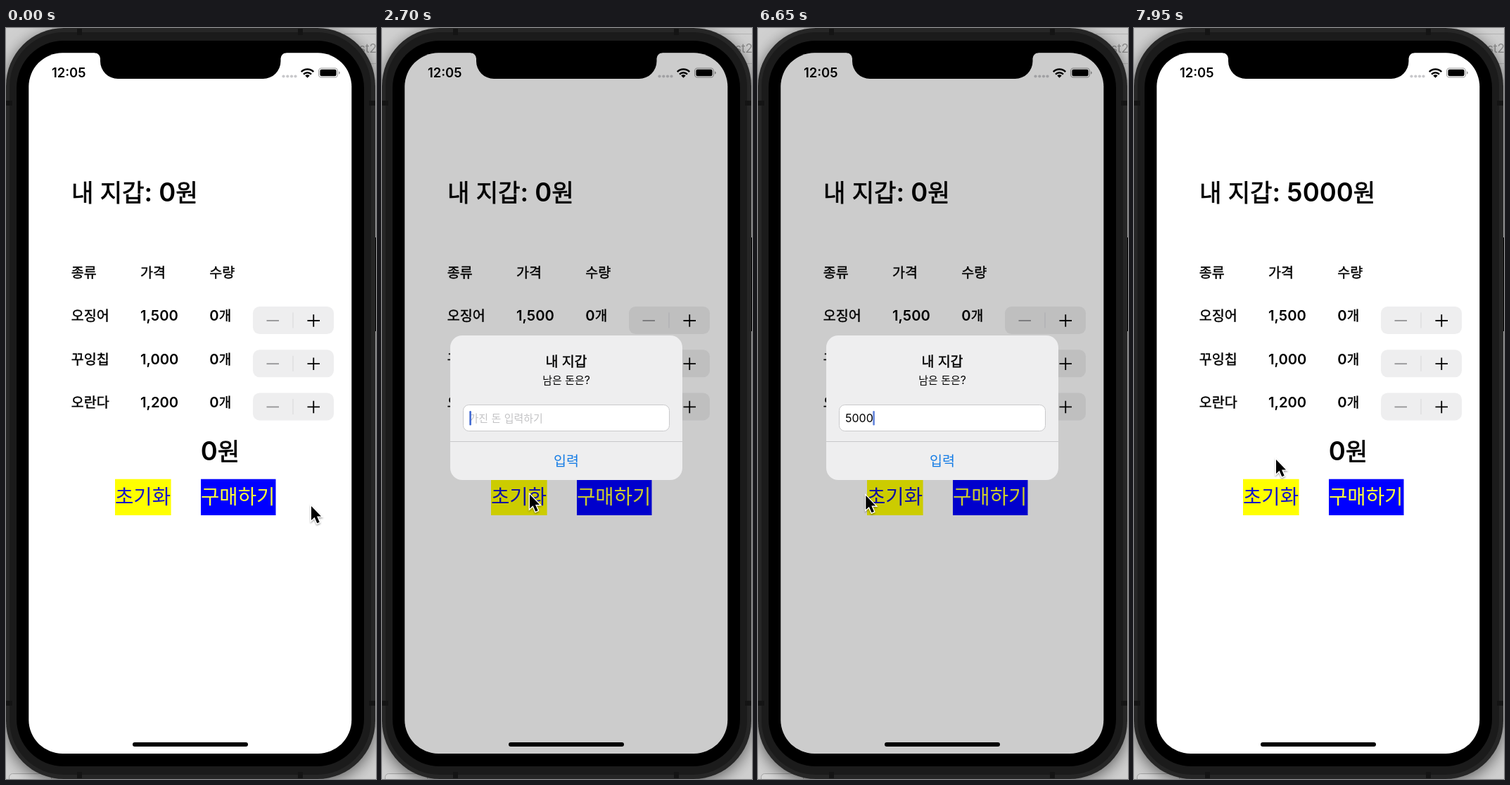
An HTML page that plays this animation: 526x1065 px, repeating every 8 s.

```html
<!DOCTYPE html>
<html lang="ko">
<head>
<meta charset="utf-8">
<title>내 지갑</title>
<style>
  html, body { margin: 0; width: 100%; height: 100%; overflow: hidden; background: #d0d0d0; }
  svg { display: block; width: 526px; height: 1065px; }
  text { font-family: Inter, "Noto Sans CJK KR", sans-serif; white-space: pre; }
  .ko { font-family: "Noto Sans CJK KR", "Noto Sans CJK", sans-serif; font-weight: 400; }
</style>
</head>
<body>
<svg id="stage" viewBox="0 0 526 1065" xmlns="http://www.w3.org/2000/svg"></svg>
<script>
const LOOP = 8000;
const stage = document.getElementById('stage');

// Hangul runs are set slightly smaller than Latin ones; bold adds a thin outline.
const runs = (str, size, bold) => str.replace(/[가-힣]+/g, run =>
  `<tspan class="ko" font-size="${size * 0.94}"` +
  (bold ? ` stroke="currentColor" stroke-width="${size * 0.02}"` : '') + `>${run}</tspan>`);

const label = (str, x, y, size, { bold = true, color = '#000', anchor = 'start', id = '' } = {}) =>
  `<text id="${id}" x="${x}" y="${y}" font-size="${size}" font-weight="${bold ? 600 : 400}"
    fill="${color}" color="${color}" text-anchor="${anchor}">${runs(str, size, bold)}</text>`;

const rect = (x, y, w, h, r, fill, extra = '') =>
  `<rect x="${x}" y="${y}" width="${w}" height="${h}" rx="${r}" fill="${fill}" ${extra}/>`;

const line = (d, color, width, extra = '') =>
  `<path d="${d}" fill="none" stroke="${color}" stroke-width="${width}" ${extra}/>`;

const stepper = y => rect(351, y, 115, 39, 9.5, '#eeeeef') +
  line(`M408 ${y + 8.5}v22`, '#dadadc', 1.2) +
  line(`M370.5 ${y + 20}h17.5`, '#949496', 1.8) +
  line(`M428.5 ${y + 20}h17.5m-8.75 -8.75v17.5`, '#000', 1.8);

const row = ([name, price], i) => {
  const y = 415.3 + i * 61.2;
  return label(name, 92.7, y, 20.8) + label(price, 191, y, 20.2) +
    label('0개', 289.3, y, 20.2) + stepper(395 + i * 61.2);
};

const device = `
  <defs>
    <filter id="soft" x="-50%" y="-50%" width="200%" height="200%">
      <feDropShadow dx="0" dy="1.5" stdDeviation="1.3" flood-opacity=".4"/>
    </filter>
    <filter id="shade" x="-10%" y="-10%" width="120%" height="120%">
      <feDropShadow dx="0" dy="5" stdDeviation="11" flood-opacity=".55"/>
    </filter>
  </defs>
  ${rect(0, 0, 526, 1065, 0, '#d0d0d0')}
  ${line('M480 8.5h46M480 50.5h46', '#b4b4b4', 1)}
  ${label('st2', 502, 35, 17, { bold: false, color: '#8b8b8b' })}
  ${rect(4.5, 1057.5, 60, 20, 5, '#d8d8d8', 'stroke="#a4a4a4"')}
  ${rect(522, 297, 6, 133, 1, '#000')}
  ${rect(0, 0, 525, 1065, 82, '#282828', 'filter="url(#shade)"')}
  ${rect(5, 6, 514, 1053, 77, '#1b1b1b')}
  ${line('M104.5 1v9M418.5 1v9M104.5 1055v9M418.5 1055v9M0 106.5h9M516 106.5h9M0 957.5h9M516 957.5h9', '#141414', 7)}
  ${rect(15, 18, 494, 1029, 67, '#000')}`;

const app = `
  ${rect(32.3, 35.3, 459, 993.7, 48, '#fff')}
  <g fill="#c8c8cb">${[394.5, 400.3, 406, 411.5].map(x => `<circle cx="${x}" cy="68.5" r="2.1"/>`).join('')}</g>
  ${label('12:05', 65, 69.8, 18.4)}
  ${line('M419.8 62.2a12.3 12.3 0 0 1 17.4 0M423 65.6a7.8 7.8 0 0 1 11 0', '#000', 2.5)}
  <path d="M425.3 67.6a4.6 4.6 0 0 1 6.4 0l-3.2 3.2z"/>
  ${rect(444.6, 57, 26.8, 13, 3.8, 'none', 'stroke="#9d9d9d" stroke-width="1.1"')}
  ${rect(446.4, 58.8, 23.2, 9.4, 2.2, '#000')}
  <path d="M473 61.3q1.8 .7 1.8 2.2t-1.8 2.2z" fill="#9d9d9d"/>
  <g id="wallet"></g>
  ${label('종류', 92.7, 353.5, 20.8)}${label('가격', 191, 353.5, 20.8)}${label('수량', 289.3, 353.5, 20.8)}
  ${[['오징어', '1,500'], ['꾸잉칩', '1,000'], ['오란다', '1,200']].map(row).join('')}
  ${label('0원', 276.7, 613.3, 36.4)}
  ${rect(155, 639.7, 79.6, 51.3, 0, '#ff0')}${rect(277, 639.7, 106.5, 51.3, 0, '#00f')}
  ${label('초기화', 155, 675.4, 30.5, { bold: false, color: '#1414cc', id: 'reset' })}
  ${label('구매하기', 277, 675.4, 30.5, { bold: false, color: '#ffff38' })}
  ${rect(32.3, 35.3, 459, 993.7, 48, '#000', 'id="dim"')}
  <path d="M126 34v1.3a8 8 0 0 1 8 8V47a25 25 0 0 0 25 25H365.5a25 25 0 0 0 25 -25V43.3a8 8 0 0 1 8 -8V34z"/>
  ${rect(180, 1013, 164, 6, 3, '#000')}`;

const alertBox = `<g id="alert">
  ${rect(97, 436, 330, 205, 17, '#eeeeef')}
  ${label('내 지갑', 262, 480.3, 20.8, { anchor: 'middle' })}
  ${label('남은 돈은?', 262, 504.8, 15.9, { bold: false, anchor: 'middle' })}
  ${rect(115.5, 534.5, 293, 37, 8, '#fff', 'stroke="#c9c9cb" id="field"')}
  ${label('가진 돈 입력하기', 123.5, 559.3, 15.9, { bold: false, color: '#c3c3c5', id: 'hint' })}
  ${label('', 124, 559.3, 16, { bold: false, id: 'value' })}
  ${rect(124.3, 543, 2.6, 20.5, 1.2, '#4169d2', 'id="caret"')}
  ${line('M97 586.5h330', '#c8c8ca', 1)}
  ${label('입력', 262, 621.3, 20.8, { bold: false, color: '#147ce5', anchor: 'middle' })}
</g>`;

const pointer = `<g id="pointer" filter="url(#soft)">
  <path d="M0 0V20L4.6 15.8 8.3 24.2 11.7 22.7 8 14.5H14z" stroke="#fff" stroke-width="2.6" paint-order="stroke"/>
</g>`;

stage.innerHTML = device + app + alertBox + pointer;
const $ = id => document.getElementById(id);

const clamp = v => Math.min(1, Math.max(0, v));
const ramp = (t, from, to) => clamp((t - from) / (to - from));
const ease = u => u * u * (3 - 2 * u);

// Critically damped spring, time in ms.
const spring = t => t <= 0 ? 0 : 1 - (1 + t * 0.023) * Math.exp(-t * 0.023);

const pointerPath = [
  [0, 434, 678], [700, 210, 661.5], [5300, 210, 661.5], [5500, 150.5, 665],
  [6400, 150.5, 665], [6450, 151.5, 665], [6600, 151.5, 665], [7050, 202, 612]
];
function pointerAt(t) {
  const i = pointerPath.findIndex(key => key[0] > t);
  if (i < 0) return pointerPath.at(-1).slice(1);
  const [t0, x0, y0] = pointerPath[i - 1], [t1, x1, y1] = pointerPath[i];
  const u = ease(ramp(t, t0, t1));
  return [x0 + (x1 - x0) * u, y0 + (y1 - y0) * u];
}

const edits = [[3850, '5'], [4100, '50'], [4250, '500'], [4450, '5000'], [4850, '50000'], [6150, '5000']];

// Solid for half a second after each edit, then a one-second blink.
function caretAt(t, since) {
  if (t >= 6800) return 0;
  const phase = (t - since) % 1000;
  return 1 - ramp(phase, 470, 650) + ramp(phase, 850, 1000);
}

let walletText = '';
function draw(t) {
  const shown = spring(t - 1575), closed = spring(t - 7164);
  const opacity = shown * (1 - closed);
  const scale = 1.2 - 0.2 * shown;

  const wallet = t < 7500 ? '내 지갑: 0원' : '내 지갑: 5000원';
  if (wallet !== walletText) {
    $('wallet').innerHTML = label(wallet, 93, 246, 36.4);
    walletText = wallet;
  }

  const pressed = ramp(t, 700, 800) - ramp(t, 900, 1100);
  $('reset').setAttribute('opacity', 1 - 0.7 * pressed);
  $('dim').setAttribute('opacity', 0.2 * opacity);
  $('alert').setAttribute('opacity', opacity);
  $('alert').setAttribute('transform', `translate(262 538.5) scale(${scale}) translate(-262 -538.5)`);

  // The field only turns fully white once the alert is opaque.
  const white = 255 - 80 * (1 - opacity);
  $('field').setAttribute('fill', `rgb(${white},${white},${white})`);

  const [since, text] = edits.findLast(edit => edit[0] <= t) || [1650, ''];
  $('value').textContent = text;
  $('hint').setAttribute('visibility', text ? 'hidden' : 'visible');
  $('caret').setAttribute('x', 124.3 + (text ? $('value').getComputedTextLength() - 0.8 : 0));
  $('caret').setAttribute('opacity', caretAt(t, since));

  $('pointer').setAttribute('transform', `translate(${pointerAt(t)})`);
}

const start = performance.now();
function tick(now) {
  draw(Math.max(0, now - start) % LOOP);
  requestAnimationFrame(tick);
}
draw(0);
requestAnimationFrame(tick);
</script>
</body>
</html>
```
